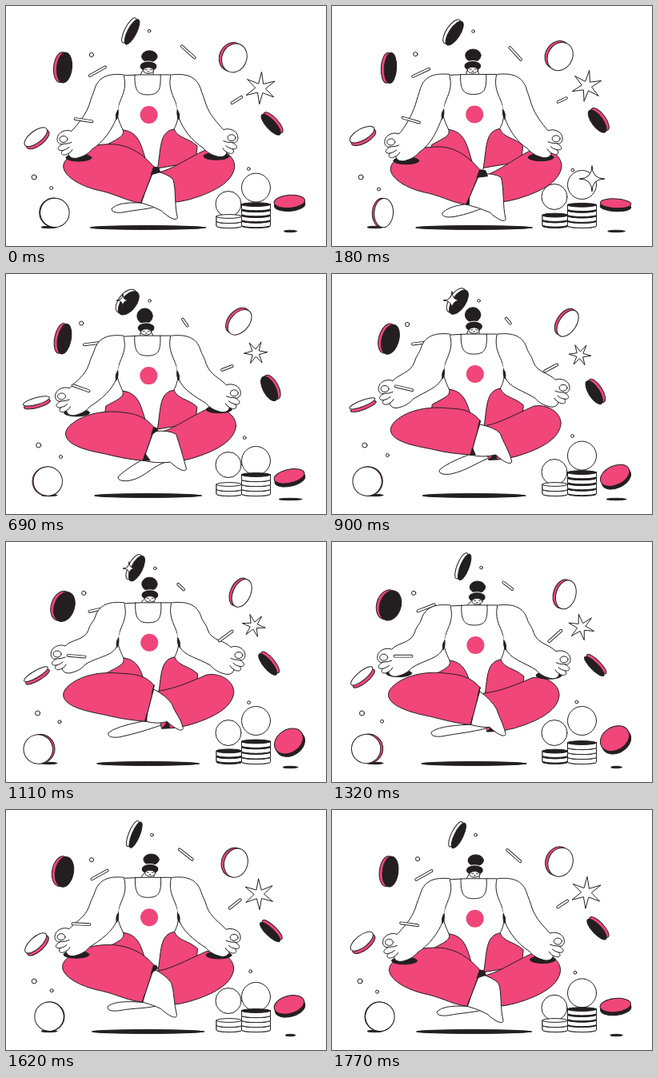
An HTML page for the animation above (1.8 s loop, 400x300 px).

```html
<!DOCTYPE html>
<html lang="en">
<head>
<meta charset="utf-8">
<title>Floating meditation</title>
<style>
  html, body { margin: 0; width: 100%; height: 100%; overflow: hidden; background: #fff; }
  svg { display: block; width: 100vw; height: 100vh; }
</style>
</head>
<body>
<svg id="stage" viewBox="0 0 400 300" stroke-linecap="round" stroke-linejoin="round"></svg>
<script>
const LOOP = 1800, BEAT = LOOP / 2, STEP = 30;
const INK = '#231f20', PINK = '#f0467a', WHITE = '#fff';
const stage = document.getElementById('stage');
let now = 0;

// Sways around a base value once per loop, highest at the peak time.
const wave = (base, amount, peak) => base + amount * Math.cos((now - peak) / LOOP * 2 * Math.PI);

// Rises from 0 to 1 and back around a center time, once per period.
function bump(center, width, period = LOOP) {
  const phase = (now - center) / period;
  const distance = (phase - Math.round(phase)) * period;
  return Math.max(0, 1 - (distance / width) ** 2);
}

const add = (p, x, y) => [p[0] + x, p[1] + y];
const mix = (p, q, u) => [p[0] + (q[0] - p[0]) * u, p[1] + (q[1] - p[1]) * u];

const shape = (fill, ...d) => `<path d="${d.join(' ')}" fill="${fill}" stroke="${INK}"/>`;
const line = (...d) => shape('none', ...d);
const oval = (x, y, rx, ry, fill = WHITE) =>
  `<ellipse cx="${x}" cy="${y}" rx="${rx}" ry="${ry}" fill="${fill}" stroke="${INK}"/>`;
const dot = (x, y, r) => oval(x, y, r, r);

function star(x, y, radius, points, turn) {
  const corners = Array.from({ length: points * 2 }, (_, i) => {
    const angle = turn + i * Math.PI / points, r = radius * (i % 2 ? 0.32 : 1);
    return [x + r * Math.sin(angle), y - r * Math.cos(angle)];
  });
  return shape(WHITE, 'M', corners.join(' L '), 'Z');
}

function sparkle(x, y, r) {
  if (r < 1) return '';
  const c = [x, y];
  return shape(WHITE, 'M', [x, y - r], 'Q', c, [x + r, y], 'Q', c, [x, y + r],
    'Q', c, [x - r, y], 'Q', c, [x, y - r], 'Z');
}

function stick(x, y, length, angle) {
  const bar = (color, width) => `<path d="M${-length / 2},0 h${length}" stroke="${color}" stroke-width="${width}"/>`;
  return `<g transform="translate(${x} ${y}) rotate(${angle})">${bar(INK, 3.8)}${bar(WHITE, 2)}</g>`;
}

// The rim is a second disc shifted along the coin's short axis.
function coin(face, rim, x, y, rx, ry, turn, shift) {
  return `<g transform="translate(${x} ${y}) rotate(${turn})">`
    + oval(shift / 2, 0, rx, ry, rim) + oval(-shift / 2, 0, rx, ry, face) + '</g>';
}

// gap(i) is how far layer i floats above the one below, from 0 to 1.
function stack(x, w, layers, gap, topFill) {
  const side = (fill, y, h) => shape(fill, `M${x - w},${y} v${h} a${w},2.6 0 0 0 ${2 * w},0 v${-h} Z`);
  let out = '', y = 275;
  for (let i = 1; i <= layers; i++) {
    const height = 6 + gap(i);
    y -= height;
    out += side(INK, y, height) + side(WHITE, y, height - 2 * gap(i))
      + oval(x, y, w, 2.4, i === layers ? topFill : INK);
  }
  return out;
}

function arm(side, body, hand, shade) {
  const b = (x, y) => body(side * x, y);
  const h = (x, y) => add(hand, side * x, y);
  const elbow = mix(b(73, 123), h(-32, -44), 0.2);
  const wrist = h(-9, -11);
  const shadow = shade > 0.4 ? oval(...h(-18, 18 + shade), 16, 4.5, INK) : '';
  return shadow
    + shape(WHITE, 'M', b(30, 86), 'C', b(48, 84), b(61, 88), b(66, 103),
      'C', b(68, 110), add(elbow, -side * 2, -8), elbow,
      'C', add(elbow, side * 5, 14), add(wrist, -side * 8, -9), wrist,
      'C', h(-2, -14), h(9, -10), h(9, -1), 'C', h(9, 4), h(5, 6), h(2, 5),
      'C', h(10, 9), h(9, 14), h(2, 13), 'C', h(6, 17), h(2, 21), h(-5, 17),
      'C', h(-6, 23), h(-13, 24), h(-18, 22), 'C', h(-26, 20), h(-32, 15), h(-34, 12),
      'C', h(-50, 2), b(44, 153), b(39, 140))
    + oval(...h(1, -1), 5, 4)
    + line('M', h(2, 5), 'Q', h(-5, 5), h(-9, 3))
    + line('M', h(2, 13), 'Q', h(-3, 12), h(-6, 9))
    + line('M', h(-5, 17), 'Q', h(-9, 15), h(-10, 12))
    + shape(INK, 'M', b(37, 130), 'Q', b(41, 135), b(39, 142), 'Q', b(36, 137), b(37, 130));
}

function head(body) {
  const face = [wave(177.8, 3.6, 1370), wave(74, 5, 50)];
  const f = (x, y) => add(face, x, y);
  return shape(WHITE, 'M', body(-9, 86), 'L', f(-7, 1), 'L', f(6, 1), 'L', body(7, 86))
    + oval(wave(177.7, 4.7, 1450), wave(57, 6, 0), 9.7, wave(8.2, 1.4, 700), INK)
    + `<ellipse cx="${face[0]}" cy="${face[1] - 3.5}" rx="11" ry="6.5" fill="${INK}" stroke="${WHITE}"/>`
    + oval(...f(0, 1.6), 6.5, 3.8)
    + line('M', f(-4, 0.5), 'q1.2,1.2 2.4,0') + line('M', f(2, 0.5), 'q1.2,1.2 2.4,0')
    + line('M', f(-1, 3), 'h2');
}

function torso(b) {
  const hips = shape(PINK, 'M', b(-31, 155), 'C', b(-28, 163), b(-38, 166), b(-52, 174),
    'L', b(-55, 195), 'L', b(0, 205), 'L', b(60, 195), 'L', b(62, 175),
    'C', b(50, 164), b(38, 166), b(33, 154), 'Z');
  const suit = shape(WHITE, 'M', b(-30, 87), 'L', b(-9, 86), 'L', b(7, 86), 'L', b(29, 86),
    'C', b(24, 108), b(37, 116), b(38, 134), 'C', b(38, 143), b(36, 148), b(33, 154),
    'C', b(14, 157), b(17, 178), b(12, 206), 'L', b(2, 206),
    'C', b(-8, 178), b(-8, 158), b(-31, 155),
    'C', b(-34, 148), b(-37, 143), b(-38, 134), 'C', b(-37, 116), b(-24, 108), b(-30, 87));
  const neckline = line('M', b(-16, 86), 'C', b(-17, 107), b(-11, 111), b(0, 111),
    'C', b(13, 111), b(17, 106), b(16, 86));
  const [x, y] = b(1.5, 136);
  return hips + suit + neckline + `<circle cx="${x}" cy="${y}" r="11" fill="${PINK}"/>`;
}

function legs() {
  const knee = [wave(72.5, 2.3, 550), wave(198, 7, 330)];
  const cuffTop = [185, wave(192, 13, 230)];
  const cuffEnd = [wave(171, 3, 1100), wave(236, 12, 170)];
  const farKnee = [wave(286, 2, 480), wave(194, 7, 60)];
  const ankle = [wave(209.5, 4, 500), wave(208, 9, -50)];
  const toe = [wave(219.5, 6, 750), wave(249, 17, 140)];
  const farToe = [wave(133.3, 9.3, 480), wave(249, 11.5, 350)];
  const farCalf = add(farKnee, -44, 37);
  const farCuff = add(farCalf, -46, 8);
  const thigh = add(knee, 64, -28);
  const shin = add(mix(knee, cuffEnd, 0.5), 0, 8);
  const foldTop = Math.max(0, wave(3, 4, 250)), foldEnd = Math.max(0, wave(2, 4, 600));

  const farFoot = shape(WHITE, 'M', add(cuffEnd, -3, 0), 'Q', add(farToe, 8, -8), farToe,
    'C', add(farToe, -1, 5), add(farToe, 6, 6), add(farToe, 14, 5),
    'C', add(farToe, 34, 1), add(cuffEnd, 8, 9), add(cuffEnd, 28, 2), 'Z');
  const farLeg = shape(PINK, 'M', add(cuffTop, 0, 8),
    'C', add(cuffTop, 20, 6), add(farKnee, -61, -10), add(farKnee, -34, -22),
    'C', add(farKnee, -18, -25), add(farKnee, 0, -15), farKnee,
    'C', add(farKnee, -2, 18), add(farCalf, 22, -8), farCalf,
    'Q', add(farCalf, -24, 9), farCuff, 'Z');
  const foot = shape(WHITE, 'M', add(cuffTop, 0, 5), 'Q', mix(cuffTop, add(ankle, 0, -4), 0.7), ankle,
    'C', add(ankle, 4, 12), add(toe, -4, -15), toe,
    'C', add(toe, 0, 5), add(toe, -8, 3), add(toe, -20, -8), 'Q', add(cuffEnd, 15, 4), cuffEnd, 'Z');
  const nearLeg = shape(PINK, 'M', cuffTop,
    'C', add(cuffTop, -14, -16), add(thigh, 20, 2), thigh,
    'C', add(thigh, -22, -1), add(knee, 24, -24), add(knee, 12, -16),
    'C', add(knee, 3, -10), add(knee, 0, -5), knee,
    'C', add(knee, 1, 14), add(shin, -22, -4), shin, 'C', add(shin, 20, 5), add(cuffEnd, -15, -1), cuffEnd, 'Z');
  return farFoot + farLeg + shape(INK, 'M', farCuff, 'q5,-4 7,-10 l3,9 Z') + foot + nearLeg
    + shape(INK, 'M', cuffTop, 'l', [foldTop, 1], 'l', [foldTop * 0.4, foldTop], 'L', mix(cuffTop, cuffEnd, 0.22), 'Z')
    + shape(INK, 'M', cuffEnd, 'l', [foldEnd * 1.5, 0], 'L', mix(cuffEnd, cuffTop, 0.2), 'Z');
}

function figure() {
  const center = wave(177.2, 0.7, 1300), lift = wave(-5.5, 5.5, 50);
  const body = (x, y) => [center + x, y + lift];
  const shade = wave(2.2, 2.2, 150);
  return head(body) + torso(body) + legs()
    + arm(-1, body, [wave(70, 5, 270), wave(156, 15, 200)], shade)
    + arm(1, body, [wave(284.5, 5.5, 1150), wave(154.5, 12.5, 130)], shade);
}

function coins() {
  return coin(INK, WHITE, wave(156.3, 7.5, 1330), wave(32.7, 2.6, 600), wave(7, 2.2, 650), 17.3, wave(30.5, 9.5, 550), -4)
    + coin(INK, PINK, 71, wave(79, 2.2, 850), wave(10, 3.2, 1300), 19, wave(11, 8, 1150), -4)
    + coin(WHITE, PINK, wave(288.5, 5, 1000), wave(62.5, 3.5, 1500), wave(13, 2.4, 60), 18.4, wave(28.5, 13.5, 570), -3.5)
    + coin(INK, PINK, wave(331, 2.3, 220), wave(147, 7, 1350), wave(6.3, 1.8, 520), 16.7, wave(-37.5, 9.5, 600), 4)
    + coin(WHITE, PINK, 38.5, wave(164.5, 4.7, 1400), wave(5.7, 1.8, 0), 17, wave(61, 14, 630), 4)
    + coin(WHITE, PINK, wave(52.5, 11, 220), wave(258.7, 0.5, 700), 18.2 - 8 * bump(330, 330), 18.2, wave(-4, 9, 0), wave(0, 3, 1250))
    + coin(PINK, INK, 354.5, wave(250, 4.7, 700), wave(10, 4.7, 1230), 19.3, wave(75, 19, 280), 4);
}

// The piles hop twice per loop, with the upper layers floating longer.
function stacks() {
  const leftHop = bump(300, 230, BEAT);
  return dot(312.5, 223.5 + 10 * bump(700, 250, BEAT), 18)
    + dot(278, 238.5 + 9 * bump(0, 150, BEAT), 16)
    + stack(279, 16, 2, () => leftHop, leftHop > 0.2 ? INK : WHITE)
    + stack(312.5, 18, 4, i => bump(80, 60 + 45 * i, BEAT), INK);
}

function dots() {
  return dot(wave(100.5, 6.8, 1700), wave(62, 2, 1200), 2.6)
    + dot(wave(181.3, 5.5, 1230), wave(32.3, 1.2, 800), 1.8)
    + dot(wave(38, 3, 820), 214, 3)
    + dot(wave(63, 6.5, 850), wave(227, 2.8, 400), 2)
    + dot(wave(302, 4.3, 1450), wave(203, 3, 400), 1.9);
}

function shadows() {
  return oval(177.5, 277, wave(68.3, 4.5, 150), 2.4, INK)
    + oval(54, 276.5, 10, 1.2, INK)
    + oval(355.5, 281.5, wave(10.3, 4.3, 600), 1.2, INK);
}

function scene() {
  const spin = (4 + 60 * now / LOOP) * Math.PI / 180;
  return shadows()
    + stick(wave(113, 5, 1430), wave(84, 3, 700), 22, wave(-18, 12, 800))
    + stick(wave(224, 5.3, 230), wave(58, 3.4, 500), wave(14.7, 6.8, 0), wave(46, 9, 580))
    + coins() + dots() + figure()
    + stick(wave(93.5, 5.5, 250), 142.7, 21, wave(11, 11.5, 500))
    + stick(wave(281, 7.5, 50), 117.5, wave(15.5, 5, 1250), wave(-30, 12, 500))
    + stacks()
    + star(wave(314, 4.5, 120), wave(102, 4.5, 1400), wave(17, 3, 0), 6, spin)
    + sparkle(325, 216, 16 * bump(180, 150))
    + sparkle(146 + (now - 690) * 0.019, 33, 11 * bump(900, 400));
}

function frame() {
  now = Math.floor(performance.now() % LOOP / STEP) * STEP;
  stage.innerHTML = scene();
  requestAnimationFrame(frame);
}
frame();
</script>
</body>
</html>
```
